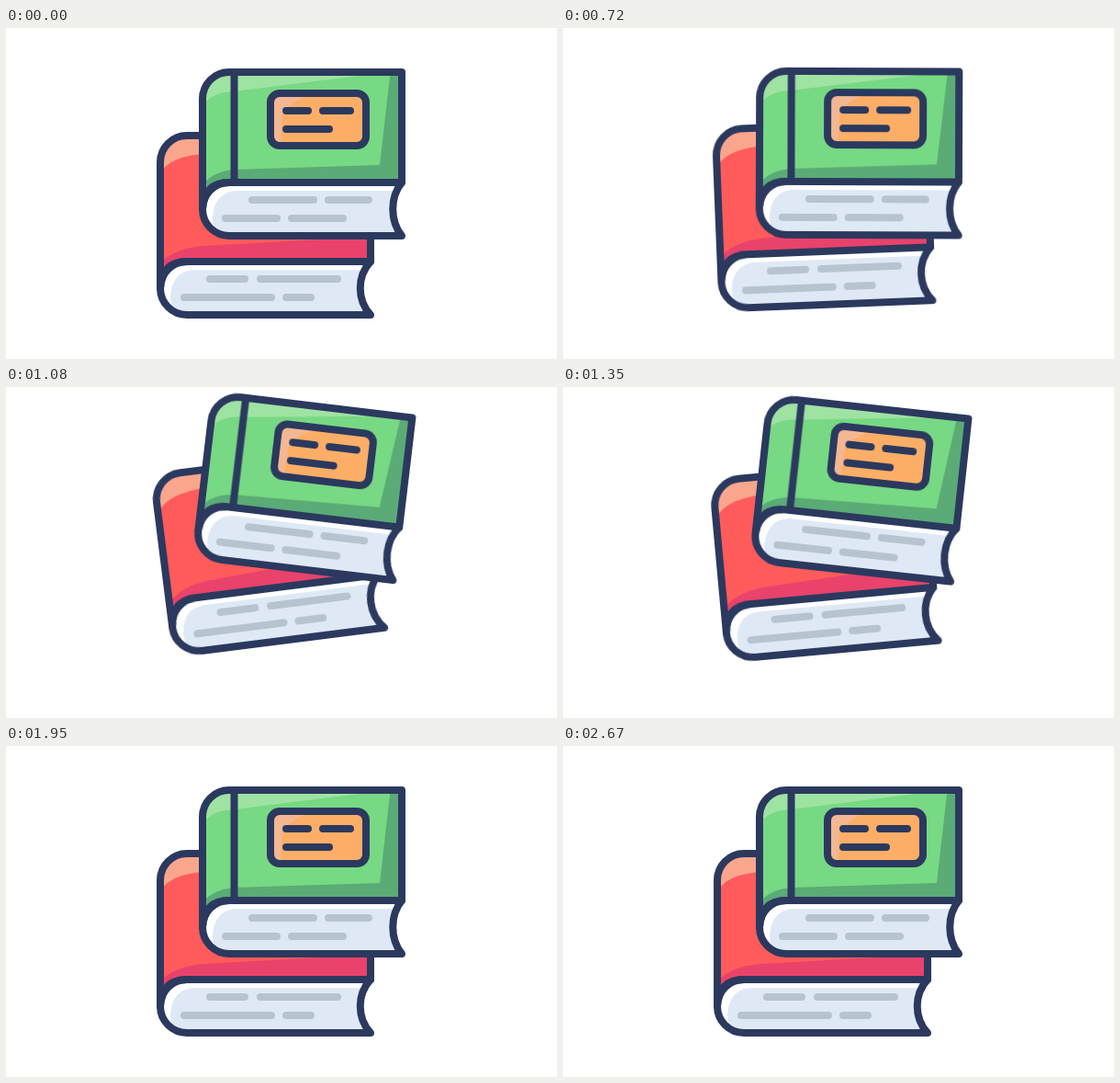
Animation of 600 by 360 pixels, one loop 2.7 s. Source, as an HTML page without scripts:

```html
<!DOCTYPE html>
<html lang="en">
<head>
<meta charset="utf-8">
<title>Two books</title>
<style>
  html, body { margin: 0; width: 100%; height: 100%; overflow: hidden; background: #fff; }
  svg { display: block; width: 100vw; height: 100vh; }

  .book { animation: 2.7s cubic-bezier(.333, 0, .667, 1) infinite; }
  .red { transform-origin: 5px 167px; animation-name: lift-red; }
  .green { transform-origin: 560px 137px; animation-name: lift-green; }

  @keyframes lift-red {
    0%, 20.37%, 61.11%, 100% { transform: rotate(0deg); }
    37.22%, 44.26% { transform: rotate(-7.2deg); }
  }
  @keyframes lift-green {
    0%, 25%, 63.48%, 100% { transform: rotate(0deg); }
    41.85%, 46.56% { transform: rotate(7deg); }
  }

  .ink, .text { fill: none; stroke: #2b395e; stroke-width: 8; stroke-linecap: round; stroke-linejoin: round; }
  .text { stroke: #b8c3d0; }
  .paper { fill: #fff; }
  .tint { fill: #dfe9f6; }
</style>
</head>
<body>
<svg viewBox="0 0 600 360">
  <defs>
    <path id="red-cover" d="M397 254V117H197a29 29 0 0 0-29 29V283q2-29 29-29z"/>
    <path id="red-pages" d="M397 254H197a29 29 0 0 0 0 58H397C382 296 382 270 397 254z"/>
    <path id="green-cover" d="M431 168V48H243a29 29 0 0 0-29 29V197q2-29 29-29z"/>
    <path id="green-pages" d="M431 168H243a29 29 0 0 0 0 58H431C418 210 418 184 431 168z"/>
    <clipPath id="red-cover-clip"><use href="#red-cover"/></clipPath>
    <clipPath id="red-pages-clip"><use href="#red-pages"/></clipPath>
    <clipPath id="green-cover-clip"><use href="#green-cover"/></clipPath>
    <clipPath id="green-pages-clip"><use href="#green-pages"/></clipPath>
    <clipPath id="label-clip"><rect x="288" y="71" width="104" height="57" rx="10"/></clipPath>
  </defs>

  <g class="book red">
    <use href="#red-cover" fill="#ff5b5b"/>
    <g clip-path="url(#red-cover-clip)">
      <path fill="#faa68c" d="M168 158Q178 140 214 137L397 122V112H160V158z"/>
      <path fill="#e9426b" d="M168 256Q182 240 215 237L397 227V290H160z"/>
    </g>
    <use href="#red-pages" class="paper"/>
    <path class="tint" clip-path="url(#red-pages-clip)" d="M410 263H203Q180 266 179 293Q179 304 186 312H410z"/>
    <path class="text" d="M222 273H260M277 273H361M194 293H289M305 293H332"/>
    <use href="#red-cover" class="ink"/>
    <use href="#red-pages" class="ink"/>
  </g>

  <g class="book green">
    <use href="#green-cover" fill="#77d983"/>
    <g clip-path="url(#green-cover-clip)">
      <path fill="#9fe3a3" d="M214 84Q224 70 248 69L400 50V40H205V84z"/>
      <path fill="#5aab76" d="M419 44L407 149L248 154Q226 156 214 170V200H435V44z"/>
    </g>
    <use href="#green-pages" class="paper"/>
    <path class="tint" clip-path="url(#green-pages-clip)" d="M445 177H249Q226 180 225 207Q225 218 232 226H445z"/>
    <path class="text" d="M268 187H335M351 187H395M239 207H295M311 207H367"/>
    <use href="#green-cover" class="ink"/>
    <use href="#green-pages" class="ink"/>
    <path class="ink" d="M248.5 48V168"/>
    <g clip-path="url(#label-clip)">
      <path fill="#fdae66" d="M284 67H396V132H284z"/>
      <path fill="#f3b792" d="M284 67H345Q304 80 301 96L299 132H284z"/>
    </g>
    <rect class="ink" x="288" y="71" width="104" height="57" rx="10"/>
    <path class="ink" d="M305 90H329M345 90H375M305 110H352"/>
  </g>
</svg>
</body>
</html>
```
